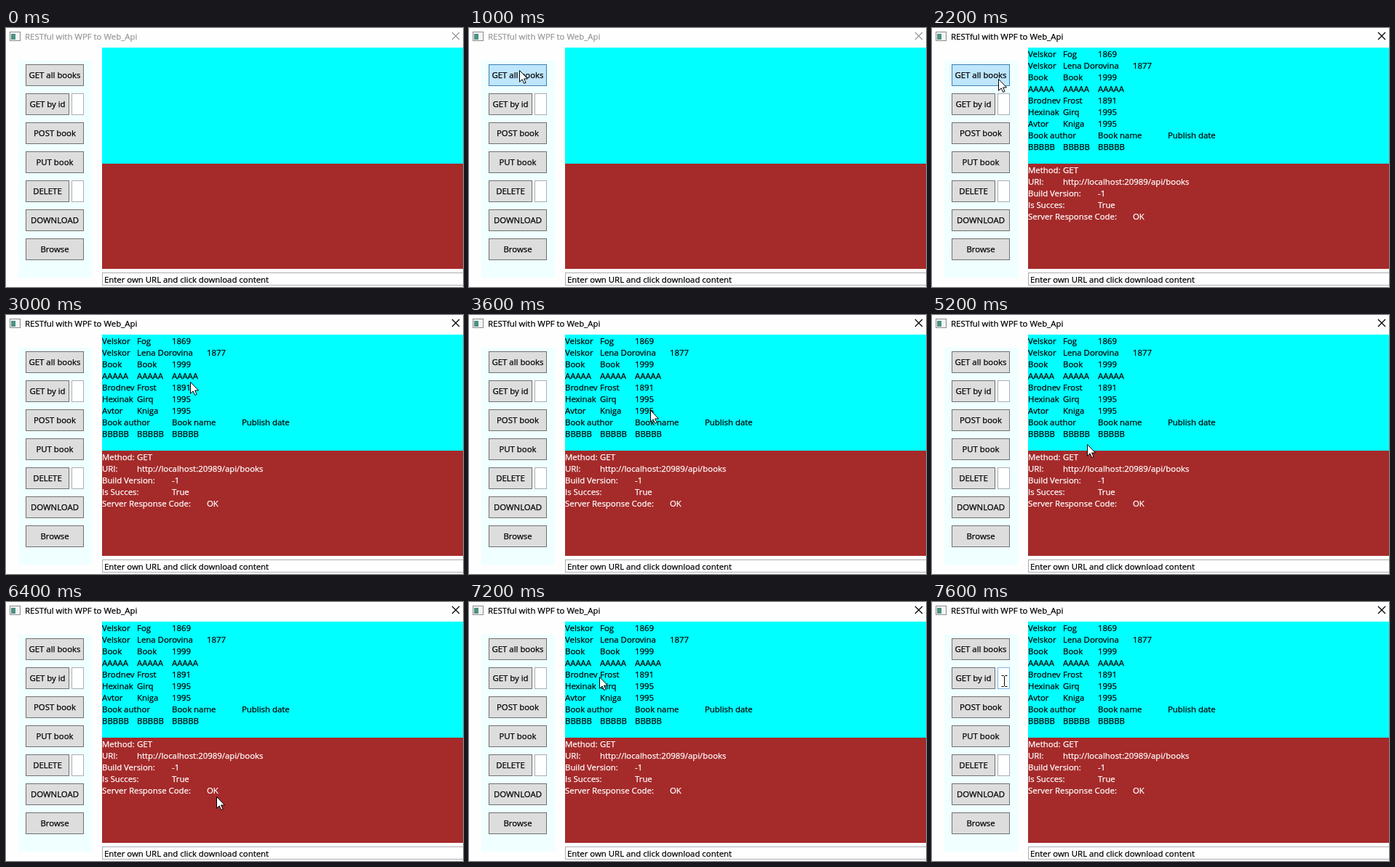
Recreate the animation shown at these times as an HTML page. Size 628 by 357 pixels, loop 8000 ms.

```html
<!DOCTYPE html>
<html lang="en">
<head>
<meta charset="utf-8">
<title>RESTful client</title>
<style>
html, body { margin: 0; width: 100%; height: 100%; overflow: hidden; background: #fff; }
svg { display: block; width: 628px; height: 357px; color: #000; }
text {
  font: 11.4px "Open Sans", "Noto Sans", sans-serif; white-space: pre;
  fill: currentColor; stroke: currentColor; stroke-width: .25px;
}
.button rect { fill: #ddd; stroke: #707070; }
.button text { text-anchor: middle; }
.button.hover rect { fill: #bee6fd; stroke: #3c7fb1; }
.button.pressed rect { fill: #c4e5f6; stroke: #2c628b; }
.box { fill: #fff; stroke: #abadb3; }
.box.hover { stroke: #7eb4ea; }
.caption { color: #999; }
.caption.active { color: #000; }
#response { color: #fff; }
</style>
</head>
<body>
<svg viewBox="0 0 628 357">
  <rect width="628" height="357" fill="#fefefe"/>
  <rect x="5.5" y="5.5" width="14" height="12" fill="#f4f4f4" stroke="#8c8c8c"/>
  <rect x="7" y="8" width="6" height="8" fill="#4d9184"/>
  <g class="caption">
    <text x="26" y="16">RESTful with WPF to Web_Api</text>
    <path d="M613 6l10 10m0-10l-10 10" stroke="currentColor" stroke-width="1.3"/>
  </g>
  <rect x="17" y="45" width="101" height="299" fill="#f0ffff"/>
  <g id="controls"></g>
  <rect x="132" y="27" width="496" height="160" fill="#0ff"/>
  <rect x="132" y="187" width="496" height="145" fill="#a52a2a"/>
  <g id="books"></g>
  <g id="response"></g>
  <rect class="box" x="132.5" y="337.5" width="500" height="17"/>
  <text x="135" y="351">Enter own URL and click download content</text>
  <path id="arrow" d="M.5 .5V16.3L4.1 12.9L6.7 18.5L9.1 17.4L6.6 12H11.5Z" fill="#fff" stroke="#000"/>
  <path id="beam" d="M-4 -7.5h3l1 1l1-1h3M0 -6.5V6.5M-4 7.5h3l1-1l1 1h3" fill="none" stroke="#000"/>
</svg>
<script>
const LOOP = 8000, STEP = 100, TAB = 48;
const APPEAR = 300, CLICK = 1400, RESPONSE = 1700;
const $ = id => document.getElementById(id);

const labels = ["GET all books", "GET by id", "POST book", "PUT book", "DELETE", "DOWNLOAD", "Browse"];
const hasInput = row => row === 1 || row === 4;
const rowTop = row => 50 + row * 40;
const buttonWidth = row => hasInput(row) ? 60 : 80;

$("controls").innerHTML = labels.map((label, row) => {
  const y = rowTop(row), width = buttonWidth(row);
  const input = hasInput(row) ? `<rect class="box" x="90.5" y="${y + .5}" width="16" height="29"/>` : "";
  return `<g class="button"><rect x="27.5" y="${y + .5}" width="${width - 1}" height="29"/>
    <text x="${27 + width / 2}" y="${y + 19}">${label}</text></g>${input}`;
}).join("");

// Each "|" advances to the next tab stop.
function writeLines(id, y, lines) {
  $(id).innerHTML = lines.map((line, row) => line.split("|").map((cell, col) =>
    cell && `<text x="${132 + col * TAB}" y="${y + row * 16}">${cell}</text>`).join("")).join("");
}
writeLines("books", 40, [
  "Velskor|Fog|1869",
  "Velskor|Lena Dorovina||1877",
  "Book|Book|1999",
  "AAAAA|AAAAA|AAAAA",
  "Brodnev|Frost|1891",
  "Hexinak|Girq|1995",
  "Avtor|Kniga|1995",
  "Book author||Book name||Publish date",
  "BBBBB|BBBBB|BBBBB"
]);
writeLines("response", 200, [
  "Method:|GET",
  "URI:|http://localhost:20989/api/books",
  "Build Version:||-1",
  "Is Succes:||True",
  "Server Response Code:|||OK"
]);

// The pointer makes curved strokes, each starting where the last one ended.
const origin = [511, 88];
const strokes = [
  { start: APPEAR, end: 1000, bend: [100, 70], to: [69, 58] },
  { start: 2100, end: 3000, bend: [170, 118], to: [253, 92] },
  { start: 3000, end: 3900, bend: [328, 115], to: [169, 156] },
  { start: 3900, end: 4800, bend: [115, 172], to: [295, 164] },
  { start: 4800, end: 5700, bend: [172, 180], to: [187, 194] },
  { start: 5700, end: 6400, bend: [230, 225], to: [289, 268] },
  { start: 6800, end: 7300, bend: [363, 120], to: [80, 84] },
  { start: 7300, end: 7600, bend: [80, 100], to: [99, 109] }
];
const curve = (a, b, c, k) => (1 - k) ** 2 * a + 2 * k * (1 - k) * b + k * k * c;

function pointerAt(t) {
  return strokes.reduce((from, { start, end, bend, to }) => {
    const k = Math.min(1, Math.max(0, (t - start) / (end - start)));
    return from.map((a, axis) => Math.round(curve(a, bend[axis], to[axis], k)));
  }, origin);
}

const buttons = [...document.querySelectorAll(".button")];
const idBox = document.querySelector("#controls .box");
const caption = document.querySelector(".caption");
const show = (element, on) => element.style.display = on ? "" : "none";
const place = (element, x, y) => element.setAttribute("transform", `translate(${x} ${y})`);

function render(now) {
  const t = Math.floor(now % LOOP / STEP) * STEP;
  const visible = t >= APPEAR;
  const [x, y] = pointerAt(t);
  const over = (left, row, width) =>
    visible && x >= left && x < left + width && y >= rowTop(row) && y < rowTop(row) + 30;
  const overInput = over(90, 1, 17);

  buttons.forEach((button, row) => button.classList.toggle("hover", over(27, row, buttonWidth(row))));
  buttons[0].classList.toggle("pressed", t === CLICK);
  idBox.classList.toggle("hover", overInput);
  caption.classList.toggle("active", t >= CLICK);
  show($("books"), t >= RESPONSE);
  show($("response"), t >= RESPONSE);

  show($("arrow"), visible && !overInput);
  show($("beam"), overInput);
  place($("arrow"), x, y);
  place($("beam"), x + .5, y);
}

const start = performance.now();
function frame() {
  render(performance.now() - start);
  requestAnimationFrame(frame);
}
frame();
</script>
</body>
</html>
```
